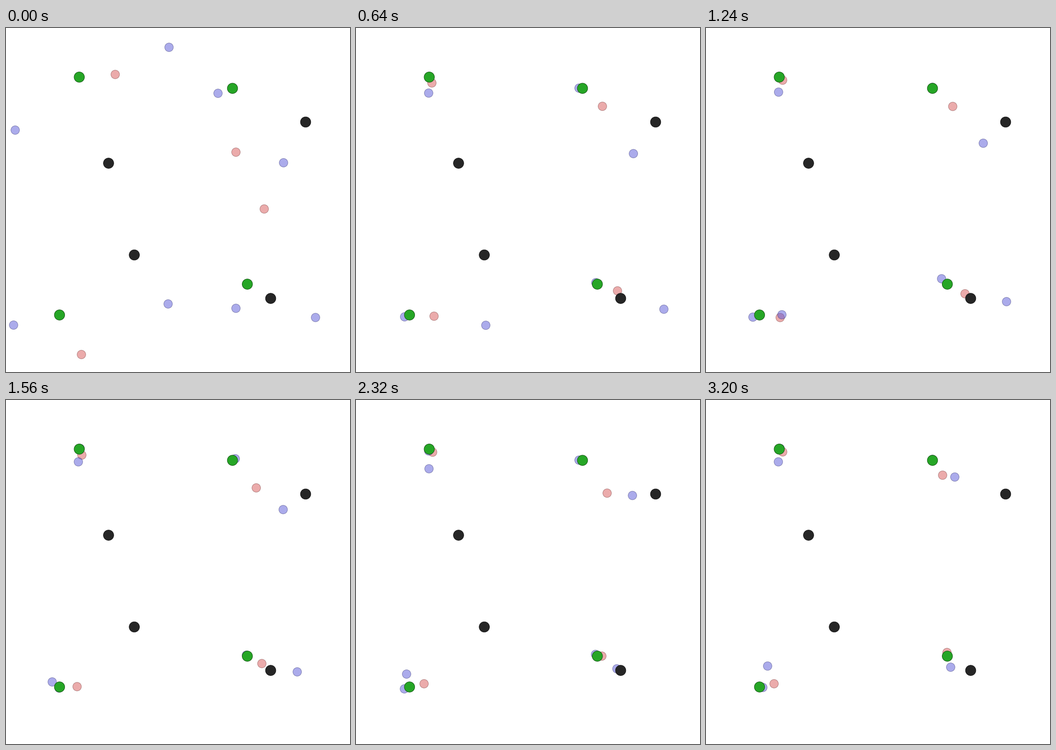
Animation, 748 px wide and 748 px high, one loop 3.24 s. Source, as a matplotlib script:

```python
import numpy as np
import matplotlib.pyplot as plt
from matplotlib.animation import FuncAnimation
from matplotlib.patches import Circle

SIZE, FRAMES, INTERVAL = 748, 81, 40
DAMPING = 0.25
AGENT_R, LANDMARK_R = 0.0125 * SIZE, 0.015 * SIZE

BLUE, PINK = (0.35, 0.35, 0.85), (0.85, 0.35, 0.35)
GREEN, BLACK = (0.15, 0.65, 0.15), (0.15, 0.15, 0.15)

steps = np.arange(FRAMES)


def travel(n):
    """Distance at unit cruising speed of a damped body starting from rest."""
    keep = 1 - DAMPING
    return n - keep / DAMPING * (1 - keep ** n)


def glide(t, y, at):
    """Monotone cubic through (t, y), resting on the last value."""
    h = np.diff(t)
    d = np.diff(y) / h
    m = np.concatenate([d[:1], np.zeros(len(d) - 1), d[-1:]])
    for k in range(1, len(d)):
        if d[k - 1] * d[k] > 0:
            m[k] = 2 / (1 / d[k - 1] + 1 / d[k])
    at = np.minimum(at, t[-1])
    i = np.clip(np.searchsorted(t, at, side="right") - 1, 0, len(h) - 1)
    s = (at - t[i]) / h[i]
    ease = s * s * (3 - 2 * s)
    bend = s * (1 - s) * (m[i] * (1 - s) - m[i + 1] * s)
    return y[i] + (y[i + 1] - y[i]) * ease + h[i] * bend


def roam(*stops, sway=(0, 0), period=1, peak=0):
    """Glide through (step, x, y) stops, then sway about the last one."""
    when, *xy = np.array(stops, float).T
    path = np.column_stack([glide(travel(when), c, travel(steps)) for c in xy])
    settled = np.clip((steps - when[-1]) / 4, 0, 1)
    swing = settled * np.cos(2 * np.pi * (steps - peak) / period)
    return path + np.outer(swing, sway)


pink_paths = [
    roam((0, 237.5, 101), (10, 173, 128.5), (16, 165, 119.5),
         sway=(-2, 7.5), period=22.5, peak=22),
    roam((0, 500, 270), (10, 539.5, 196), (22, 532, 158.5),
         (50, 550.5, 208), (80, 514.5, 163.5)),
    roam((0, 561.5, 393.5), (10, 569, 550), (22, 567.5, 580), (68, 524, 549)),
    roam((0, 164, 710), (10, 171, 620.5), (22, 167, 633), (47, 148, 617)),
]

blue_paths = [
    roam((0, 354.5, 42), (10, 172, 88), (15, 161, 106),
         sway=(-3, 5), period=8.2, peak=33),
    roam((0, 20, 222), (10, 150, 123), (16, 158, 141.5),
         sway=(1, 11), period=12.5, peak=47),
    roam((0, 461, 142), (8, 490.5, 129.5),
         sway=(9, -2), period=7, peak=18.5),
    roam((0, 603.5, 293), (56, 602, 211), (80, 541, 167.5)),
    roam((0, 352.5, 600), (10, 314, 636), (22, 245.5, 651),
         (31, 165, 623.5), (40, 99, 612), (80, 134, 578.5)),
    roam((0, 16.5, 646), (10, 112, 627),
         sway=(12, -2), period=6.65, peak=47),
    roam((0, 500, 609.5), (9, 518.5, 551),
         sway=(6.5, 6), period=5.7, peak=74),
    roam((0, 673, 629.5), (22, 667, 604), (31, 653.5, 595), (68, 532, 581)),
]

fig = plt.figure(figsize=(SIZE / 100, SIZE / 100), dpi=100, facecolor="white")
ax = fig.add_axes((0, 0, 1, 1))
ax.set(xlim=(0, SIZE), ylim=(SIZE, 0))
ax.axis("off")


def dot(center, radius, color, alpha=1):
    edge = tuple(c / 2 for c in color)
    patch = Circle(center, radius, facecolor=color, edgecolor=edge,
                   linewidth=0.72, alpha=alpha)
    return ax.add_patch(patch)


agents = [(dot(path[0], AGENT_R, color, 0.5), path)
          for color, paths in ((PINK, pink_paths), (BLUE, blue_paths))
          for path in paths]

for spot in ((159.3, 106.8), (492.5, 131.2), (524.8, 557), (116.4, 624)):
    dot(spot, LANDMARK_R, GREEN)
for spot in ((651.5, 204.5), (223, 294), (279, 493.5), (575.5, 588)):
    dot(spot, LANDMARK_R, BLACK)


def update(n):
    for patch, path in agents:
        patch.set_center(path[n])
    return [patch for patch, _ in agents]


anim = FuncAnimation(fig, update, frames=FRAMES, interval=INTERVAL,
                     repeat=True, repeat_delay=0)
plt.show()
```
